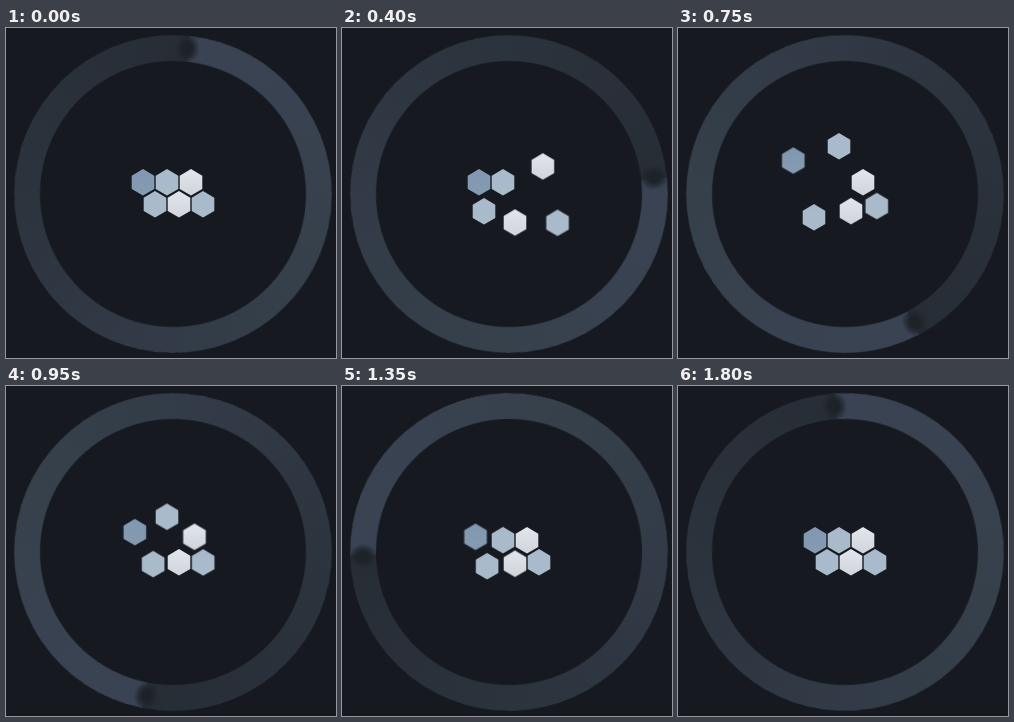
An HTML page without scripts for the animation above (1.85 s loop, 330 by 330 pixels).

```html
<!DOCTYPE html>
<html lang="en">
<head>
<meta charset="utf-8">
<title>Hexagon loader</title>
<style>
  html, body {
    margin: 0;
    width: 100%;
    height: 100%;
    overflow: hidden;
    background: #16191f;
  }

  .stage {
    position: relative;
    width: 330px;
    height: 330px;
    overflow: hidden;
  }

  .ring {
    position: absolute;
    left: 8px;
    top: 7px;
    width: 318px;
    height: 318px;
    border-radius: 50%;
    background: conic-gradient(#394353, #38424f 70deg, #35404a 120deg, #323b47 180deg, #2b333c 270deg, #272d35);
    -webkit-mask: radial-gradient(circle, transparent 132.5px, #000 133.5px);
    mask: radial-gradient(circle, transparent 132.5px, #000 133.5px);
    animation: spin 1850ms linear infinite;
  }

  /* rounded dark head of the ring */
  .ring::before {
    content: "";
    position: absolute;
    left: 145px;
    top: -2px;
    width: 25px;
    height: 30px;
    background: radial-gradient(closest-side, #1d2128, #1e2329 40%, #20252c99 70%, #22272e00);
  }

  @keyframes spin {
    from { transform: rotate(6deg); }
    to { transform: rotate(366deg); }
  }

  svg {
    position: absolute;
    inset: 0;
  }

  /* --u, --v: direction; --p: reach; --k: turn in the sequence */
  .hex {
    animation: hop 1850ms cubic-bezier(.37, 0, .63, 1) calc(var(--k) * 100ms) infinite;
  }

  @keyframes hop {
    0%, 40.541%, 44.865%, 67.568%, 100% { transform: translate(0, 0); }
    13.514% { transform: translate(calc(var(--u) * var(--p)), calc(var(--v) * var(--p))); }
    54.054% { transform: translate(calc(var(--u) * 4.3px), calc(var(--v) * 4.3px)); }
  }
</style>
</head>
<body>
<div class="stage">
  <div class="ring"></div>
  <svg width="330" height="330" viewBox="0 0 330 330">
    <defs>
      <polygon id="hex" points="0,-13.2 11.3,-6.6 11.3,6.6 0,13.2 -11.3,6.6 -11.3,-6.6"/>
      <linearGradient id="deep" x2="0" y2="1">
        <stop stop-color="#8298b3"/>
        <stop offset="1" stop-color="#859bb0"/>
      </linearGradient>
      <linearGradient id="mid" x2="0" y2="1">
        <stop stop-color="#a9b9cd"/>
        <stop offset="1" stop-color="#a9bcc9"/>
      </linearGradient>
      <linearGradient id="pale" x2="0" y2="1">
        <stop stop-color="#e2e6ed"/>
        <stop offset="1" stop-color="#cfd5da"/>
      </linearGradient>
    </defs>
    <g class="hex" style="--k:4;--u:-1;--v:-1;--p:24px"><use href="#hex" x="137" y="154.3" fill="url(#deep)"/></g>
    <g class="hex" style="--k:5;--u:0;--v:-1;--p:36px"><use href="#hex" x="161" y="154.3" fill="url(#mid)"/></g>
    <g class="hex" style="--k:0;--u:1;--v:-1;--p:20px"><use href="#hex" x="185" y="154.3" fill="url(#pale)"/></g>
    <g class="hex" style="--k:3;--u:-1;--v:1;--p:20px"><use href="#hex" x="149" y="176.3" fill="url(#mid)"/></g>
    <g class="hex" style="--k:2;--u:0;--v:1;--p:20px"><use href="#hex" x="173" y="176.3" fill="url(#pale)"/></g>
    <g class="hex" style="--k:1;--u:1;--v:1;--p:19px"><use href="#hex" x="197" y="176.3" fill="url(#mid)"/></g>
  </svg>
</div>
</body>
</html>
```
